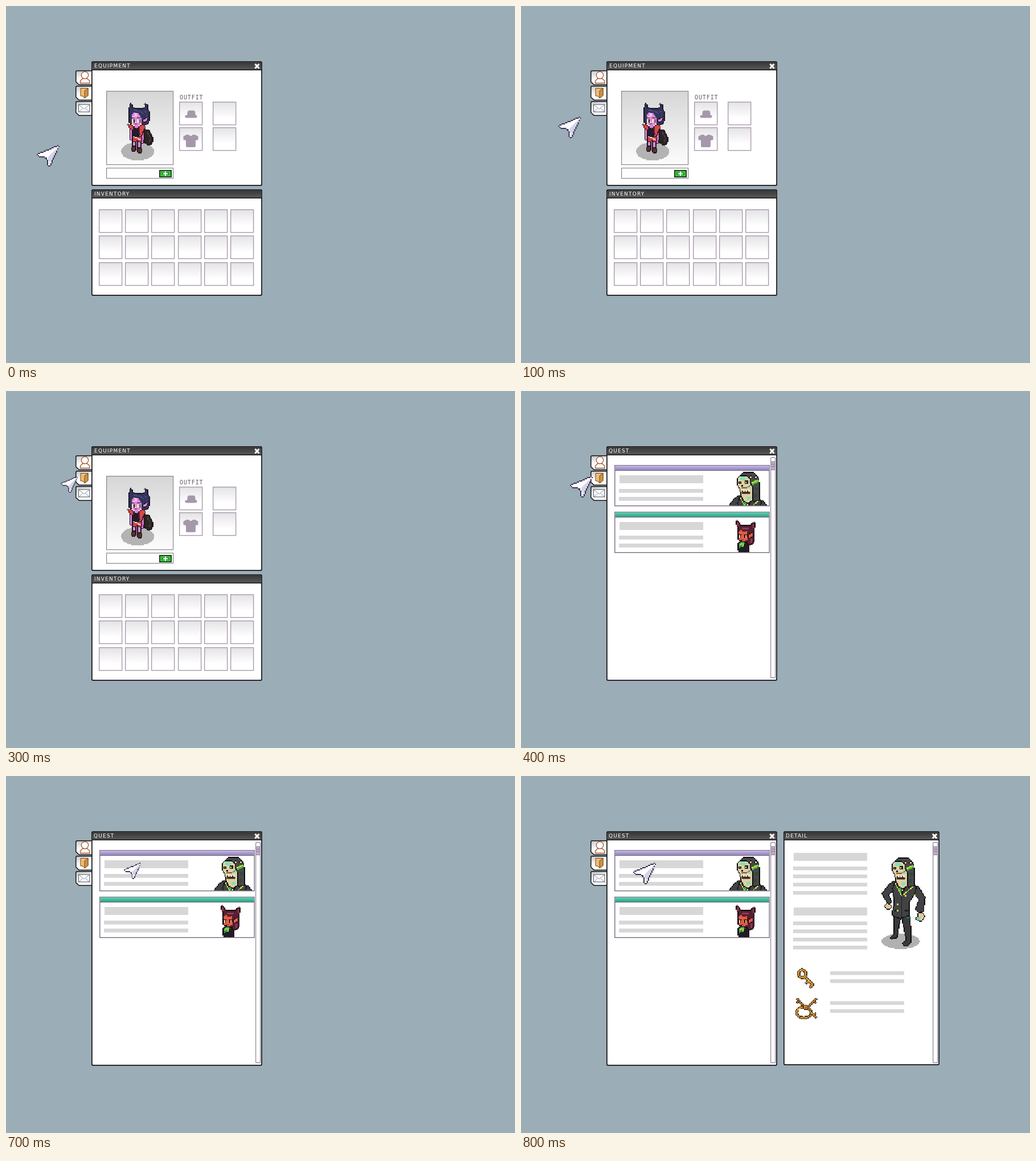
An HTML page for the animation above (1600 ms loop, 894 px wide and 627 px high).

```html
<!DOCTYPE html>
<html lang="en">
<head>
<meta charset="utf-8">
<title>Quest windows</title>
<style>
  html, body { margin: 0; width: 100%; height: 100%; overflow: hidden; background: #9badb7; }
  svg { display: block; }
  text { font: 9px "DejaVu Sans", sans-serif; letter-spacing: 1.2px; fill: #fff; }
  .label { fill: #5f5864; font: 10px "DejaVu Sans Mono", monospace; letter-spacing: .9px; }
  .equip, .quest, .detail, .cursor { animation: 1.6s step-end infinite; }
  .equip { animation-name: equip; }
  .quest { animation-name: quest; }
  .detail { animation-name: detail; }
  .cursor { animation-name: move; }
  @keyframes equip { 0% { visibility: visible; } 25%, 100% { visibility: hidden; } }
  @keyframes quest { 0% { visibility: hidden; } 25%, 100% { visibility: visible; } }
  @keyframes detail { 0% { visibility: hidden; } 50%, 100% { visibility: visible; } }
  @keyframes move {
    0% { transform: translate(94px, 244px); }
    6.25% { transform: translate(105.5px, 194px); }
    12.5% { transform: translate(126px, 149px); }
    18.75% { transform: translate(126px, 150px) scale(.75); }
    25% { transform: translate(126px, 149px); }
    31.25% { transform: translate(183px, 151px); }
    37.5% { transform: translate(237px, 152px); }
    43.75% { transform: translate(237px, 152px) scale(.75); }
    50%, 100% { transform: translate(237px, 152px); }
  }
</style>
</head>
<body>
<svg width="894" height="627" viewBox="0 0 894 627">
  <defs>
    <linearGradient id="head" x2="0" y2="1"><stop stop-color="#363636"/><stop offset="1" stop-color="#595959"/></linearGradient>
    <linearGradient id="tab" x2=".4" y2="1"><stop stop-color="#c4c4c4"/><stop offset=".6" stop-color="#fff"/></linearGradient>
    <linearGradient id="room" x2="0" y2="1"><stop stop-color="#d6d6d6"/><stop offset="1" stop-color="#fcfcfc"/></linearGradient>
    <linearGradient id="fade" x2="0" y2="1"><stop stop-color="#fff" stop-opacity="0"/><stop offset=".7" stop-color="#fff"/></linearGradient>
    <linearGradient id="violet" x2="0" y2="1"><stop stop-color="#c3b5e4"/><stop offset="1" stop-color="#8f80bb"/></linearGradient>
    <linearGradient id="teal" x2="0" y2="1"><stop stop-color="#55d3b0"/><stop offset="1" stop-color="#2f9f83"/></linearGradient>
    <pattern id="dots" width="3" height="3" patternUnits="userSpaceOnUse">
      <path d="M0 0h1.5v1.5h-1.5zM1.5 1.5h1.5v1.5h-1.5z" fill="#c9c6cb"/>
    </pattern>
    <clipPath id="card"><path d="M165 140h271v61h-271z"/></clipPath>
  </defs>
  <g class="tabs"></g>
  <g class="equip"></g>
  <g class="quest"></g>
  <g class="detail"></g>
  <g class="cursor"></g>
</svg>
<script>
const pen = document.createElement('canvas').getContext('2d');

const rect = (x, y, w, h, fill, more = '') =>
  `<rect x="${x}" y="${y}" width="${w}" height="${h}" fill="${fill}" ${more}/>`;
const path = (d, fill, more = '') => `<path d="${d}" fill="${fill}" ${more}/>`;
const line = (color, width = 1.5) => `stroke="${color}" stroke-width="${width}"`;
const add = (name, ...parts) => document.querySelector('.' + name).innerHTML = parts.join('');

// Paints shapes onto a coarse grid; each part is [fill, path, edge colour, stroke width].
function sprite([x0, y0, x1, y1], size, ink, parts) {
  const cols = Math.ceil((x1 - x0) / size), rows = Math.ceil((y1 - y0) / size);
  const grid = Array.from({ length: rows }, () => []);
  for (const [fill, d, edge = ink, width] of parts) {
    const shape = new Path2D(d);
    const hit = (c, r) => {
      const x = x0 + (c + .5) * size, y = y0 + (r + .5) * size;
      if (!width) return pen.isPointInPath(shape, x, y);
      pen.lineWidth = width;
      return pen.isPointInStroke(shape, x, y);
    };
    for (let r = 0; r < rows; r++) for (let c = 0; c < cols; c++) {
      if (hit(c, r)) grid[r][c] = fill;
      else if (edge && (hit(c - 1, r) || hit(c + 1, r) || hit(c, r - 1) || hit(c, r + 1))) grid[r][c] = edge;
    }
  }
  const layers = {};
  grid.forEach((row, r) => row.forEach((color, c) => {
    layers[color] = (layers[color] || '') + `M${x0 + c * size} ${y0 + r * size}h${size}v${size}h${-size}z`;
  }));
  return Object.entries(layers).map(([color, d]) => path(d, color, 'shape-rendering="crispEdges"')).join('');
}

function panel(x, y, w, h, title, inset = 4) {
  return rect(x + .9, y + .9, w - 1.8, h - 1.8, '#fff', 'rx="2" ' + line('#111', 1.7))
    + rect(x + 1.7, y + 1.7, w - 3.4, 13.3, 'url(#head)')
    + rect(x + 1, y + 14.6, w - 2, 1.4, '#111')
    + `<text x="${x + inset}" y="${y + 11.4}">${title}</text>`;
}
const close = (x, y) => path(`M${x - 3.6} ${y - 3.8}l7.2 7.8m0 -7.8l-7.2 7.8`, 'none', line('#fff', 3));
const slot = (x, y) => rect(x, y, 41, 41, 'url(#dots)')
  + rect(x + .7, y + .7, 40, 40, 'url(#fade)', line('#a99bad', 1.4));
const bars = (x, w, h, ...ys) => ys.map(y => rect(x, y, w, h, '#d7d7d7')).join('');
const scroll = x => rect(x + .7, 116.7, 8, 387, '#fff', 'rx="2" ' + line('#8d8296', 1.2))
  + rect(x + 1.2, 124, 7, 15, '#bba9c6')
  + path(`M${x + 1} 124h7.4m-7.4 4.5h7.4m-7.4 4h7.4m-7.4 6h7.4`, 'none', line('#8f7f9c', 1));
const card = (y, tone) => rect(164.8, y + .7, 271.4, 71, '#fff', line('#776c80', 1.4))
  + rect(165.5, y + 1.4, 270, 8, `url(#${tone})`) + rect(165, y + 9, 271, 1.2, '#776c80')
  + bars(173, 147, 14, y + 18) + bars(172, 148, 6.8, y + 42, y + 56);

const avatar = sprite([200, 167, 264, 273], 1.5, '#1b1421', [
  ['#b3b3b3', 'M202 255a29 16 0 1 0 58 0a29 16 0 1 0 -58 0', ''],
  ['#2b2422', 'M244 217L250 218L257 231L256 241L250 244L243 239L240 228Z'],
  ['#4d423c', 'M248 222l5 9l-1 8', '', 1.6],
  ['#cf7bcb', 'M237 220h4l1 12l-2 8h-3z'],
  ['#dc88d8', 'M222.5 236h4v12h-4zM231.5 236h4v13h-4z'],
  ['#5b3029', 'M222 247h5v7h-6zM231 250h6v7h-6z'],
  ['#cf4146', 'M222 230h15v8h-6v-2h-3v2h-6z'],
  ['#221c2b', 'M223 211h11v18h-11z', ''],
  ['#f0e6dc', 'M222 229l7 2l7 4', '', 1.8],
  ['#dc88d8', 'M218 215h3v20h-3z'],
  ['#dc88d8', 'M225 208h8l-1 5l-3 2l-3-2z', ''],
  ['#d64a4a', 'M214 208L223 211L222 217L219 216ZM234 211L242 208L244 213L240 217L239 228L235 224Z', '#6b1d2a'],
  ['#32345a', 'M219 171L217 179L216 186L216 203L219 207L224 200L233 200L240 208L250 206L251 186L248 180L248 174L244 171L245 177L240 180L226 180L221 178L220 172Z'],
  ['#4b5080', 'M224 183l10 1l8 5M247 190v12M242 184l5 3', '', 1.6],
  ['#dc88d8', 'M221 190L225 187L232 188L237 196L238 205L234 209L224 209L221 205Z', ''],
  ['#f6bff2', 'M226 188h4v6h-4zM222 192h3v3h-3zM225 203h3v3h-3z', ''],
  ['#dc88d8', 'M240 200L250 195L247 201L242 204Z'],
  ['#1d1729', 'M221.5 196h4v1.6h-4zM230.5 196h5v1.6h-5zM223.5 198h2v6h-2zM234 198h1.5v7h-1.5z', ''],
  ['#e3ef9d', 'M221.5 198h2v6h-2zM230.5 198h3v6h-3z', ''],
  ['#8c3f8d', 'M226 206.5h4v1.5h-4z', '']
]);

const boss = sprite([630, 140, 714, 306], 1.5, '#0c0c0c', [
  ['#b1b1b1', 'M633 290a33.5 13.5 0 1 0 67 0a33.5 13.5 0 1 0 -67 0', ''],
  ['#3a3a3d', 'M655 246L666 248L662 268L660 284L650 285L650 282L656 277Z'],
  ['#3a3a3d', 'M669 247L682 247L684 272L684 292L680 297L672 297L671 294L677 288Z'],
  ['#e0c79c', 'M640 226l4-2l6 4l-1 4l-6 1l-4-3z'],
  ['#424246', 'M656 184L647 190L634 206L642 220L647 225L650 221L645 208L656 199Z'],
  ['#e0c79c', 'M698 240l7 1l3 6l-3 6l-5 1l-7-4l4-2z'],
  ['#71d7b5', 'M694 248h6v4h-6z', ''],
  ['#424246', 'M686 192L697 194L709 213L706 237L698 239L693 234L700 216L690 206Z'],
  ['#424246', 'M657 186L653 197L656 223L653 238L653 245L666 249L681 244L681 222L691 206L693 194L684 187Z'],
  ['#1c1c1f', 'M668 211l1 37M655 236h8M674 236h6', '', 1.6],
  ['#187a42', 'M676 246h6v4h-6z', ''],
  ['#1b1b1d', 'M659 190L678 190L668 211Z', ''],
  ['#39a845', 'M664 195l4 4l-1 10l-5-9z', ''],
  ['#d9e848', 'M657 188L668 210M689 193L671 209', '', 1.6],
  ['#ece57f', 'M670 194v8', '', 1.6],
  ['#e5d64c', 'M660 224h3v3h-3zM660 234h3v3h-3zM674 209h3v3h-3zM690 208h3v3h-3z', ''],
  ['#48484b', 'M656 150L663 144L680 144L687 151L690 164L690 192L679 194L674 170Z'],
  ['#2f4a38', 'M683 170h5v5h-5zM681 180h5v8h-5z', ''],
  ['#59c332', 'M676 161L688 156L690 160L679 166Z', ''],
  ['#dbee4a', 'M677 162L688 157', '', 1.6],
  ['#dfcfa6', 'M652 154L657 150L667 150L674 156L674 164L678 170L678 192L671 197L664 194L659 184L657 173L653 167Z'],
  ['#7be2bc', 'M657 152h7l4 3l-3 3h-7zM668 187h7v4h-4l-2 3zM672 166h3v5h-3z', ''],
  ['#181818', 'M654 159h4v5h-4zM664 158h6v6h-6zM659 165h3v3h-3z', ''],
  ['#e7dd54', 'M655 161h2v2h-2zM666 160h2v2h-2z', ''],
  ['#7a553a', 'M658 170l9 1l6-3M660 181l9 1l6-2', '', 1.5],
  ['#382c2a', 'M660 176h14v4h-14z', ''],
  ['#f0e5c4', 'M661 173h3v4h-3zM666 174h3v4h-3zM671 173h3v4h-3z', ''],
  ['#d9c890', 'M674 151h3v3h-3zM682 151h3v3h-3z', '#1c1c1c']
]);

const imp = sprite([374, 223, 414, 283], 1.5, '#170b14', [
  ['#1f1f22', 'M382 266L397 264L400 270L400 283L395 283L395 278L392 283L383 283L381 276Z'],
  ['#2e9e52', 'M383 267l4-2l7 1l-4 8l-7 1z', ''],
  ['#d7d84b', 'M384 271l4-5M390 267v5', '', 1.6],
  ['#561f33', 'M379 227L378 233L382 241L382 261L397 265L400 270L407 268L409 260L409 243L410 230L405 233L403 237L387 237L383 232Z'],
  ['#913a50', 'M380 230v7M408 233v8M387 241h12M404 259v8', '', 1.6],
  ['#e15c42', 'M382 247L387 243L396 246L398 261L390 264L383 261Z', ''],
  ['#561f33', 'M386 243h11v3l-7 1z', ''],
  ['#e15c42', 'M399 252L408 249L406 255L400 258Z'],
  ['#180d15', 'M383 251h4v1.6h-4zM391 251h5v1.6h-5zM385 253h1.6v4h-1.6zM392 253h1.6v4h-1.6z', ''],
  ['#f7e6d0', 'M383.5 253h1.6v4h-1.6zM394 253h1.6v4h-1.6z', ''],
  ['#7c2a2a', 'M386 260h5v1.5h-5z', '']
]);

const keys = sprite([480, 334, 524, 430], 1.5, '#4c3119', [
  ['#c98f38', 'M487 347a6.5 6.5 0 1 0 13 0a6.5 6.5 0 1 0 -13 0M498 352L512 366M505 360l-5 4M512 366l-4 5', undefined, 2.6],
  ['#ecc26a', 'M488 344l4-3M502 356l5 5', '', 1.4],
  ['#b97c2e', 'M485 391L497 405M488 395l-4 3M503 406L518 391M513 394l4 4', undefined, 1.8],
  ['#c98f38', 'M484 415a12.5 9.5 0 1 0 25 0a12.5 9.5 0 1 0 -25 0', undefined, 2.2],
  ['#c98f38', 'M504 409L518 424M514 420l4-4M510 418l-3 4M498 404h4v4h-4z', undefined, 1.8],
  ['#ecc26a', 'M486 411l5-4M507 413l4 4', '', 1.4]
]);

const pointer = sprite([-40, 0, 0, 40], 2, '#3d3453', [
  ['#fdfdff', 'M-2 2L-38 17L-36 19L-22 22L-19 36L-17 36Z'],
  ['#d3d4ea', 'M-3 5L-20 22L-18 35Z', '']
]);

const range = (n, f) => Array.from({ length: n }, (_, i) => f(i)).join('');

add('tabs',
  range(3, i => path(`M152 ${113.8 + 27 * i}h-27q-2.2 0 -2.2 2.2v17l5.5 5.2h23.7z`, 'url(#tab)', line('#111'))),
  path('M130.5 135.5v-4l4-4h8l4.5 4v4z', '#fff', line('#a4532f', 1.3)),
  '<circle cx="138.5" cy="121.5" r="6.2" fill="#fff" stroke="#a4532f" stroke-width="1.3"/>',
  path('M131 144.5h13v13h-5v4.5l-5 -4h-3z', '#efbd74', line('#75471d', 1)),
  path('M138 149l6 -4.5v13l-6 4.5z', '#cf9440', line('#75471d', 1)),
  rect(127.5, 173, 19.5, 13, '#fff', line('#5f6679', 1.2)),
  path('M128 173.5l9.3 7.5l9.3 -7.5m-18.6 12.5l6.5 -6m12.1 6l-6.5 -6', 'none', line('#848a9c', 1)));

add('equip',
  panel(150, 97, 300, 219, 'EQUIPMENT', 5), close(441, 105.5),
  rect(176.6, 149.6, 117, 129, 'url(#room)', line('#8b878f', 1.2)), avatar,
  rect(176.6, 284.6, 117, 18, '#fff', line('#8b878f', 1.2)),
  rect(269.8, 288.8, 20.5, 11.5, '#24a52b', line('#0d2b10')),
  rect(272, 291, 16, 7, 'none', line('#6ed65f', 1)),
  path('M279 290.5h2v3h3v2h-3v3h-2v-3h-3v-2h3z', '#fff'),
  '<text class="label" x="305" y="164">OUTFIT</text>',
  slot(304, 168), slot(363, 168), slot(304, 213), slot(363, 213),
  path('M318 192l1 -7l2 -1.5h9l2 1.5l1 7h2.5v3l-2 1.5h-17l-2 -1.5v-3z', '#a698ab'),
  path('M317 226h4l2 2h3l2 -2h4l5.5 3v6l-4.5 1v10.5l-1.5 1.5h-14l-1.5 -1.5v-10.5l-4.5 -1v-6z', '#a698ab'),
  panel(150, 322, 300, 187, 'INVENTORY', 5),
  range(18, i => slot(163 + Math.round(i % 6 * 46.2), 357 + Math.round((i / 6 | 0) * 46.3))));

add('quest',
  panel(150, 97, 300, 412, 'QUEST'), close(441, 105.5), scroll(438),
  card(130, 'violet'), `<g clip-path="url(#card)"><g transform="translate(-272 -1)">${boss}</g></g>`,
  card(212, 'teal'), imp);

add('detail',
  panel(461, 97, 274, 411, 'DETAIL'), close(726.5, 105.5), scroll(723),
  bars(479, 129, 14, 135, 231), bars(478, 130, 6.5, 159, 173, 187.5, 202, 255.5, 269.5, 284, 298),
  bars(543, 130, 6.5, 343, 357, 395.5, 409.5), boss, keys);

add('cursor', pointer);
</script>
</body>
</html>
```
